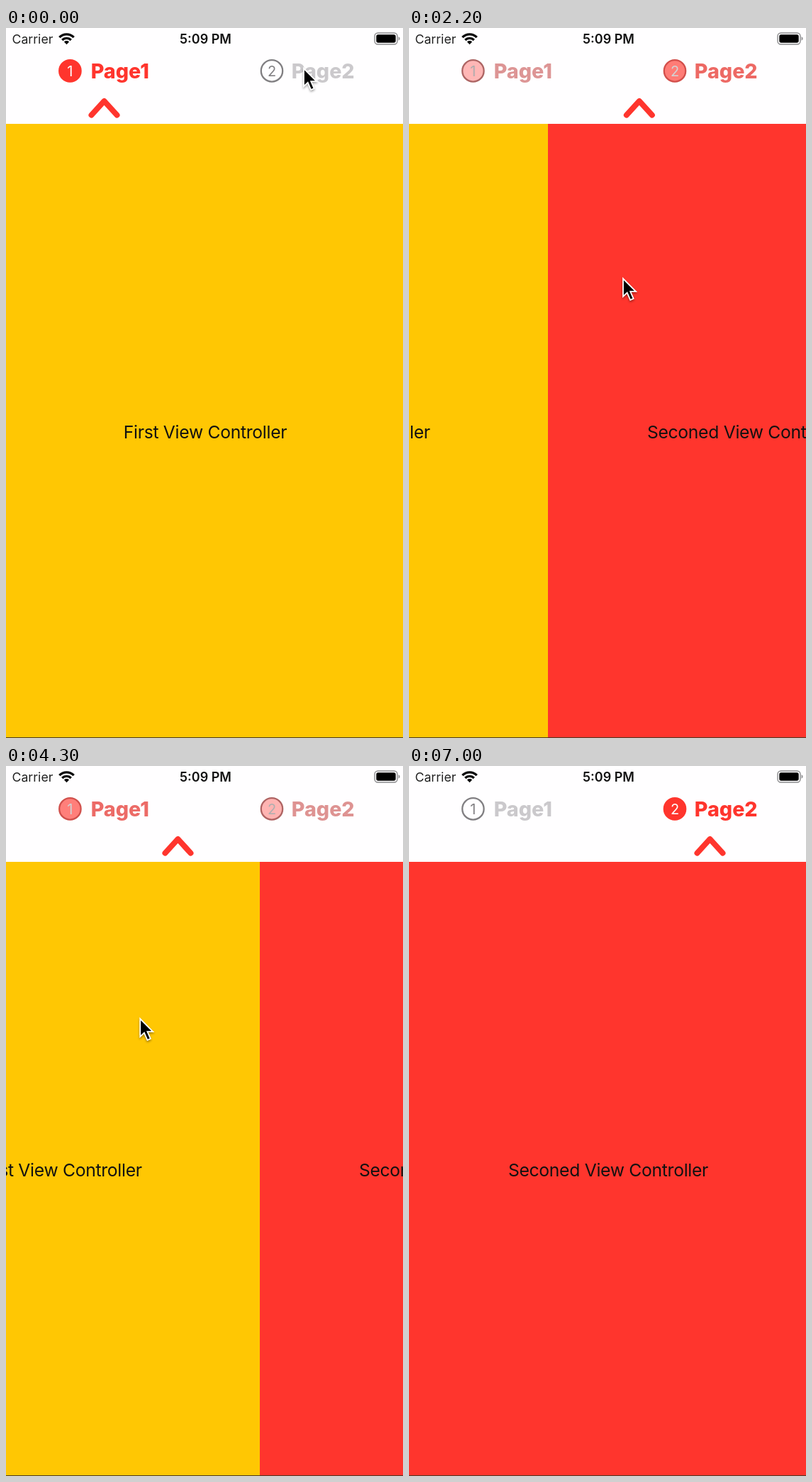
Recreate the animation shown at these times as an HTML page. Size 560 by 1000 pixels, loop 7100 ms.

```html
<!DOCTYPE html>
<html>
<head>
<meta charset="utf-8">
<style>
  html, body { margin: 0; height: 100%; overflow: hidden; background: #fffeff; }
  svg { display: block; width: 100vw; height: 100vh; font-family: Inter, "Liberation Sans", sans-serif; }
  .mid { text-anchor: middle; }
  .title { font-size: 24.7px; letter-spacing: -.3px; fill: #111; }
  .label { font-size: 28.7px; font-weight: 800; }
  .num { font-size: 20px; }
  #cursor { filter: drop-shadow(0 2px 1.5px rgba(0, 0, 0, .35)); }
</style>
</head>
<body>
<svg viewBox="0 0 560 1000">
  <rect width="560" height="1000" fill="#fffeff"/>

  <!-- status bar -->
  <text x="8.5" y="22" font-size="17.7" fill="#222">Carrier</text>
  <g fill="none" stroke="#0a0a0a" stroke-width="3.3">
    <path d="M75.3 13.2a14.3 14.3 0 0 1 20.4 0"/>
    <path d="M79.2 17a9 9 0 0 1 12.6 0"/>
  </g>
  <path d="M85.5 23.3l-3.6-3.8a5.2 5.2 0 0 1 7.2 0z" fill="#0a0a0a"/>
  <text class="mid" x="281.5" y="22" font-size="18" font-weight="600" fill="#111">5:09 PM</text>
  <rect x="520" y="7" width="32" height="16" rx="4.5" fill="none" stroke="#8b8b8d" stroke-width="1.4"/>
  <rect x="522.3" y="9.3" width="27.4" height="11.4" rx="2.6" fill="#000"/>
  <path d="M553.6 12.3q2 .8 2 2.7t-2 2.7z" fill="#8b8b8d"/>

  <!-- tabs -->
  <g class="tab">
    <circle cx="90.4" cy="60.4" r="15.2" stroke-width="2.3"/>
    <text class="mid num" x="90.2" y="67.6">1</text>
    <text class="mid label" x="160.8" y="70.6">Page1</text>
  </g>
  <g class="tab">
    <circle cx="375" cy="60.4" r="15.2" stroke-width="2.3"/>
    <text class="mid num" x="375" y="67.6">2</text>
    <text class="mid label" x="447.2" y="70.6">Page2</text>
  </g>
  <path id="arrow" d="M-18 122.6L0 102.9L18 122.6" fill="none" stroke="#ff352d"
        stroke-width="8" stroke-linecap="round" stroke-linejoin="round"/>

  <!-- pages -->
  <g id="pages">
    <rect y="135" width="562.5" height="865" fill="#ffc703"/>
    <rect x="562.5" y="135" width="562.5" height="865" fill="#ff352d"/>
    <text class="mid title" x="281" y="578">First View Controller</text>
    <text class="mid title" x="843.5" y="578">Seconed View Controller</text>
  </g>
  <rect y="999" width="560" height="1" fill="#4a3a28"/>

  <path id="cursor" d="M0 0V25.2L5.7 19.8L10.2 30L14.6 28.1L10.2 18.2H18Z"
        fill="#000" stroke="#fff" stroke-width="1.8"/>
</svg>
<script>
const LOOP = 7100, WIDTH = 562.5;
const RED = [255, 53, 45], PALE = [203, 201, 204], GRAY = [129, 127, 130], WHITE = [255, 255, 255];
const $ = s => document.querySelector(s);
const tabs = [...document.querySelectorAll('.tab')];

// [time, left edge of page 2, eased arrival]
const edgeKeys = [
  [200, WIDTH], [600, 0, 1], [1300, 0], [1400, 24], [1700, 97], [2200, 196], [2800, 359],
  [2900, 388], [3300, WIDTH, 1], [3500, WIDTH], [3800, 490], [4100, 396], [4900, 244],
  [5000, 222], [5500, 0, 1]
];
// [time, x, y] of the pointer tip
const cursorKeys = [
  [300, 420, 57], [700, 262, 205], [1100, 118, 342], [1300, 114, 345], [1400, 134, 346],
  [1700, 206, 349], [2200, 302, 353], [2800, 478, 341], [2950, 506, 340], [3400, 394, 356],
  [3800, 314, 360], [4100, 225, 358], [4900, 82, 350], [5100, 61, 348]
];
const HIDE_CURSOR = 6000;

const lerp = (a, b, k) => a + (b - a) * k;
const mix = (a, b, k) => `rgb(${a.map((v, i) => Math.round(lerp(v, b[i], k)))})`;
const smooth = k => k * k * (3 - 2 * k);

// Finds the two keys around t and the fraction between them.
function span(keys, t) {
  let i = keys.findIndex(k => k[0] > t);
  if (i < 0) i = keys.length;
  const a = keys[Math.max(i - 1, 0)], b = keys[Math.min(i, keys.length - 1)];
  return [a, b, a === b ? 0 : Math.max(0, (t - a[0]) / (b[0] - a[0]))];
}

function paintTab(tab, on) {
  const [circle, num, label] = tab.children;
  circle.setAttribute('fill', `rgba(${RED},${on})`);
  circle.setAttribute('stroke', mix(GRAY, RED, on));
  num.setAttribute('fill', mix(GRAY, WHITE, on));
  label.setAttribute('fill', mix(PALE, RED, on));
}

function draw(t) {
  const [a, b, k] = span(edgeKeys, t);
  const edge = lerp(a[1], b[1], b[2] ? smooth(k) : k);
  const p = 1 - edge / WIDTH;
  $('#pages').setAttribute('transform', `translate(${edge - WIDTH})`);
  $('#arrow').setAttribute('transform', `translate(${lerp(138.5, 424.5, p)})`);
  paintTab(tabs[0], 1 - p);
  paintTab(tabs[1], p);

  const [c, d, m] = span(cursorKeys, t);
  $('#cursor').setAttribute('transform', `translate(${lerp(c[1], d[1], m)} ${lerp(c[2], d[2], m)})`);
  $('#cursor').setAttribute('visibility', t < HIDE_CURSOR ? 'visible' : 'hidden');
}

function tick() {
  draw(Math.floor(performance.now() % LOOP / 100) * 100);
  requestAnimationFrame(tick);
}
tick();
</script>
</body>
</html>
```
